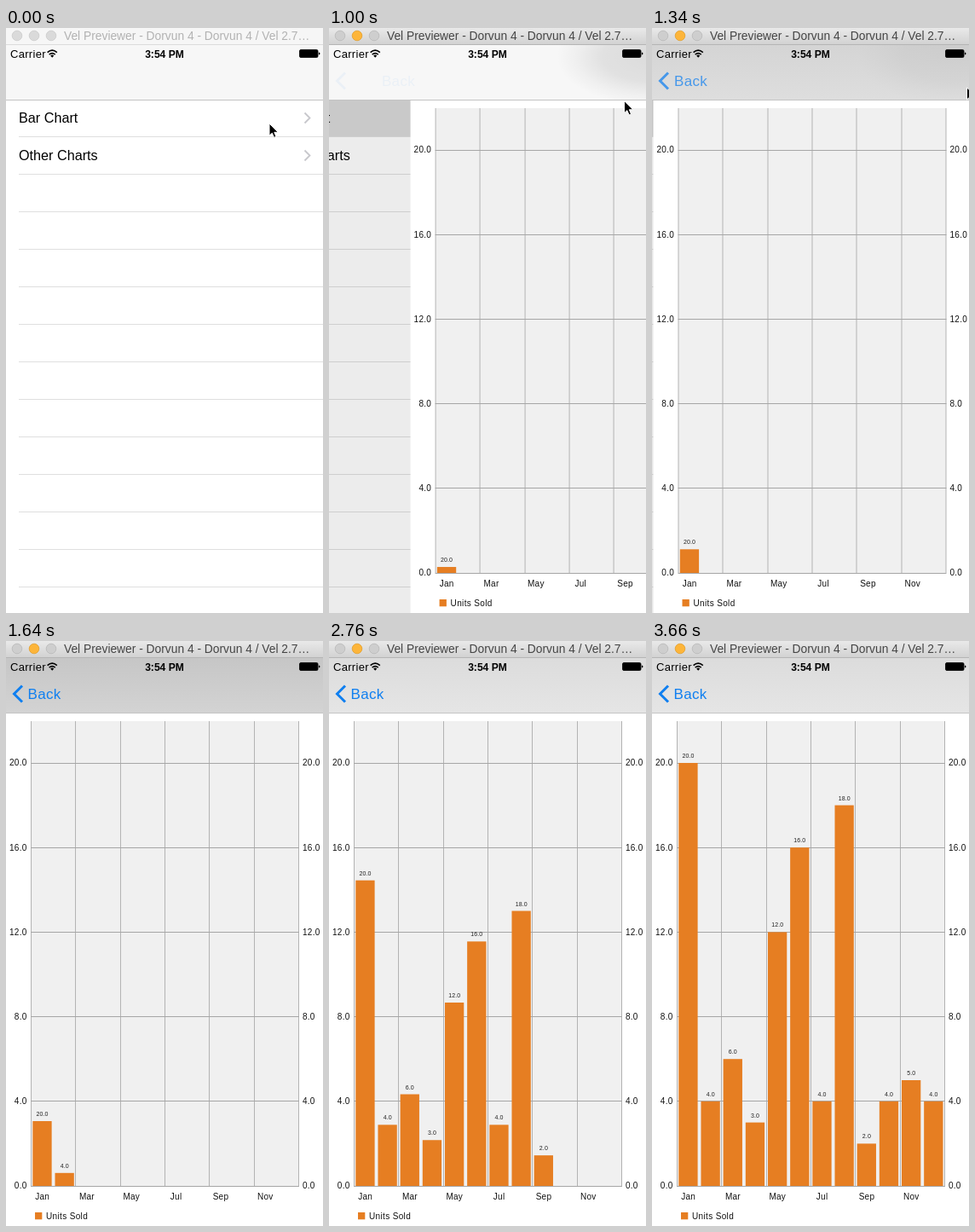
Write an HTML page that moves like this. It is 372 px wide and 686 px high and loops after 3.68 s.

```html
<!DOCTYPE html>
<html lang="en">
<head>
<meta charset="utf-8">
<title>Bar chart demo</title>
<style>
html, body { margin: 0; width: 100%; height: 100%; overflow: hidden; background: #fff; }
svg { display: block; width: 372px; height: 686px; font-family: "Liberation Sans", Arial, sans-serif; }
.row { font-size: 16.2px; }
.axis { font-size: 10px; letter-spacing: .25px; fill: #111; }
.val { font-size: 7px; letter-spacing: .1px; fill: #222; text-anchor: middle; }
.mid { text-anchor: middle; }
.end { text-anchor: end; }
</style>
</head>
<body>
<svg viewBox="0 0 372 686" xmlns="http://www.w3.org/2000/svg">
  <defs>
    <linearGradient id="titleFill" x2="0" y2="1"><stop stop-color="#e9e9e9"/><stop offset="1" stop-color="#d1d1d1"/></linearGradient>
    <linearGradient id="darkFill" x2="0" y2="1"><stop stop-color="#c6c6c6"/><stop offset="1" stop-color="#d3d3d3"/></linearGradient>
    <linearGradient id="lightFill" x2="0" y2="1"><stop stop-color="#dcdcdc"/><stop offset="1" stop-color="#e5e5e5"/></linearGradient>
    <radialGradient id="smudgeFill">
      <stop stop-color="#000" stop-opacity=".11"/><stop offset=".5" stop-color="#000" stop-opacity=".09"/>
      <stop offset=".8" stop-color="#000" stop-opacity=".03"/><stop offset="1" stop-color="#000" stop-opacity="0"/>
    </radialGradient>
    <clipPath id="navClip"><rect y="20" width="372" height="64"/></clipPath>
    <clipPath id="bodyClip"><rect y="84" width="372" height="602"/></clipPath>
  </defs>
  <rect width="372" height="686" fill="#fff"/>

  <g clip-path="url(#bodyClip)">
    <g id="list">
      <rect y="84" width="372" height="602" fill="#fff"/>
      <rect id="picked" y="84" width="372" height="44" fill="#d9d9d9"/>
      <g id="rows"></g>
      <text class="row" x="15" y="111">Bar Chart</text>
      <text class="row" x="15" y="155">Other Charts</text>
      <path d="M350.5 99.5l6 6-6 6m0 32l6 6-6 6" fill="none" stroke="#c7c7cc" stroke-width="1.8"/>
    </g>
    <rect id="dim" y="84" width="372" height="602"/>
    <g id="chart">
      <rect y="84" width="372" height="602" fill="#fff"/>
      <rect x="29.5" y="94" width="314" height="545" fill="#f0f0f0"/>
      <g id="grid"></g>
      <g id="bars"></g>
      <rect x="34" y="670" width="8.3" height="8.3" fill="#e67e22"/>
      <text class="axis" x="47" y="678" style="letter-spacing:.35px">Units Sold</text>
    </g>
  </g>

  <rect y="20" width="372" height="64" fill="#f7f7f7"/>
  <g clip-path="url(#navClip)"><ellipse id="smudge" cy="34" rx="108" ry="56" fill="url(#smudgeFill)"/></g>
  <rect id="dark" y="20" width="372" height="64" fill="url(#darkFill)"/>
  <rect id="light" y="20" width="372" height="64" fill="url(#lightFill)"/>
  <path d="M0 84.5H372" stroke="#c4c4c4"/>
  <g id="back" fill="#0f7ff0">
    <path d="M19 52.5l-9.5 9.5 9.5 9.5" fill="none" stroke="#0f7ff0" stroke-width="3"/>
    <text id="backText" y="68" font-size="17" letter-spacing=".3">Back</text>
  </g>

  <text x="5" y="35" font-size="13" letter-spacing=".3">Carrier</text>
  <g fill="none" stroke="#000" stroke-width="1.7">
    <path d="M48.6 28.6q5.6-4.8 11.2 0M50.7 31.1q3.5-2.9 7 0"/>
    <path d="M52.2 32.4q2-1.6 4 0l-2 2.4z" fill="#000" stroke="none"/>
  </g>
  <text class="mid" x="186" y="35" font-size="12.1" font-weight="bold">3:54 PM</text>
  <rect x="344.5" y="25.5" width="21.5" height="9" rx="1.5" stroke="#000" stroke-width=".8"/>
  <path d="M367 28.4q1.5.4 1.5 1.6t-1.5 1.6z"/>

  <rect id="bar" width="372" height="20"/>
  <path id="barEdge" d="M0 19.5H372"/>
  <g id="lights" stroke-width=".8">
    <circle cx="13" cy="9" r="5.8"/><circle cx="33" cy="9" r="5.8"/><circle cx="53" cy="9" r="5.8"/>
  </g>
  <text id="title" x="68" y="14" font-size="13.8">Vel Previewer - Dorvun 4 - Dorvun 4 / Vel 2.7…</text>

  <path id="cursor" d="M0 0V14.2L3.3 11.2 5.6 16.4 8 15.4 5.8 10.3H10.3Z" stroke="#fff" stroke-width="1"/>
</svg>
<script>
const LOOP = 3680, ACTIVE = 640, PUSH = 821, SETTLED = 1680;
const BASE = 639, UNIT = 24.8, LEFT = 29.5, SLOT = 26.17;
const sales = [20, 4, 6, 3, 12, 16, 4, 18, 2, 4, 5, 4];
const months = ["Jan", "Mar", "May", "Jul", "Sep", "Nov"];
// [time, x, y] and [time, progress]
const cursorPath = [[0, 309, 112], [20, 309, 112], [240, 333, 109], [700, 333, 109],
  [1000, 346.5, 85.5], [1160, 352.5, 81.5], [1400, 375, 66]];
const chartClock = [[870, 0], [1000, .0595], [1160, .133], [1640, .341], [2420, .667], [2760, .808], [3223, 1]];

const $ = id => document.getElementById(id);
const clamp = v => Math.max(0, Math.min(1, v));
const ramp = (t, a, b) => clamp((t - a) / (b - a));
const set = (el, attrs) => { for (const k in attrs) el.setAttribute(k, attrs[k]); };

function add(parent, tag, attrs, text) {
  const el = document.createElementNS("http://www.w3.org/2000/svg", tag);
  set(el, attrs);
  if (text) el.textContent = text;
  return parent.appendChild(el);
}

function along(points, t, col = 1) {
  let i = 1;
  while (i < points.length - 1 && t > points[i][0]) i++;
  const a = points[i - 1], b = points[i];
  return a[col] + (b[col] - a[col]) * ramp(t, a[0], b[0]);
}

function bounceOut(u) {
  const k = 7.5625, n = 2.75;
  if (u < 1 / n) return k * u * u;
  if (u < 2 / n) return k * (u - 1.5 / n) ** 2 + .75;
  if (u < 2.5 / n) return k * (u - 2.25 / n) ** 2 + .9375;
  return k * (u - 2.625 / n) ** 2 + .984375;
}
const bounceIn = t => 1 - bounceOut(1 - t);

// Share of the screen push still to go: a critically damped spring
function remaining(t) {
  const s = Math.max(0, t - PUSH) * .01475;
  return (1 + s) * Math.exp(-s);
}

for (let y = 127.5; y < 686; y += 44) add($("rows"), "path", { d: `M15 ${y}H372`, stroke: "#dfdfdf" });

for (let i = 0; i <= 6; i++) {
  const x = Math.floor(LEFT + i * 2 * SLOT) + .5;
  add($("grid"), "path", { d: `M${x} 94V639`, stroke: "#b3b3b3" });
}
for (let v = 0; v <= 20; v += 4) {
  const y = BASE - v * UNIT;
  add($("grid"), "path", { d: `M29 ${Math.floor(y) + .5}H344`, stroke: "#a6a6a6" });
  add($("grid"), "text", { class: "axis end", x: 24.5, y: y + 3.3 }, v.toFixed(1));
  add($("grid"), "text", { class: "axis", x: 348, y: y + 3.3 }, v.toFixed(1));
}
months.forEach((m, i) =>
  add($("grid"), "text", { class: "axis mid", x: LEFT + (2 * i + .5) * SLOT, y: 655 }, m));

const bars = sales.map((v, i) => {
  const x = LEFT + i * SLOT;
  const g = add($("bars"), "g", {});
  return {
    v, g,
    rect: add(g, "rect", { x: x + 1.8, width: 22.3, fill: "#e67e22" }),
    label: add(g, "text", { class: "val", x: x + 13 }, v.toFixed(1))
  };
});

function drawWindow(active) {
  set($("bar"), { fill: active ? "url(#titleFill)" : "#f6f6f6" });
  set($("barEdge"), { stroke: active ? "#b5b5b5" : "#dcdcdc" });
  set($("title"), { fill: active ? "#454545" : "#b2b2b2" });
  [...$("lights").children].forEach((c, i) => {
    const lit = active && i === 1;
    set(c, { fill: lit ? "#fdb53a" : active ? "#cecece" : "#dadada",
             stroke: lit ? "#e39f2c" : active ? "#b9b9b9" : "#cbcbcb" });
  });
}

function drawChart(t) {
  const phase = bounceIn(along(chartClock, t));
  const shown = Math.ceil(phase * sales.length - 1e-6);
  bars.forEach((b, i) => {
    const h = b.v * UNIT * phase;
    set(b.g, { visibility: i < shown ? "visible" : "hidden" });
    set(b.rect, { y: BASE - h, height: h });
    set(b.label, { y: BASE - h - 6 });
  });
}

function draw(t) {
  const rest = remaining(t), done = 1 - rest;
  drawWindow(t >= ACTIVE);
  drawChart(t);
  set($("picked"), { opacity: t >= 700 ? 1 : 0 });
  set($("list"), { transform: `translate(${-111.6 * done} 0)` });
  set($("dim"), { opacity: .1 * done });
  set($("chart"), { transform: `translate(${372 * rest} 0)` });
  set($("smudge"), { cx: 349 + 102 * rest, opacity: ramp(t, PUSH, 960) });
  set($("dark"), { opacity: ramp(t, 1200, 1400) });
  set($("light"), { opacity: t >= SETTLED ? 1 : 0 });
  set($("back"), { opacity: ramp(t, 975, 1480) });
  set($("backText"), { x: 25.5 + 142 * rest });
  set($("cursor"), {
    transform: `translate(${along(cursorPath, t, 1)} ${along(cursorPath, t, 2)})`,
    visibility: t < 1400 ? "visible" : "hidden"
  });
}

const start = performance.now();
function tick() {
  draw((performance.now() - start) % LOOP);
  requestAnimationFrame(tick);
}
tick();
</script>
</body>
</html>
```
